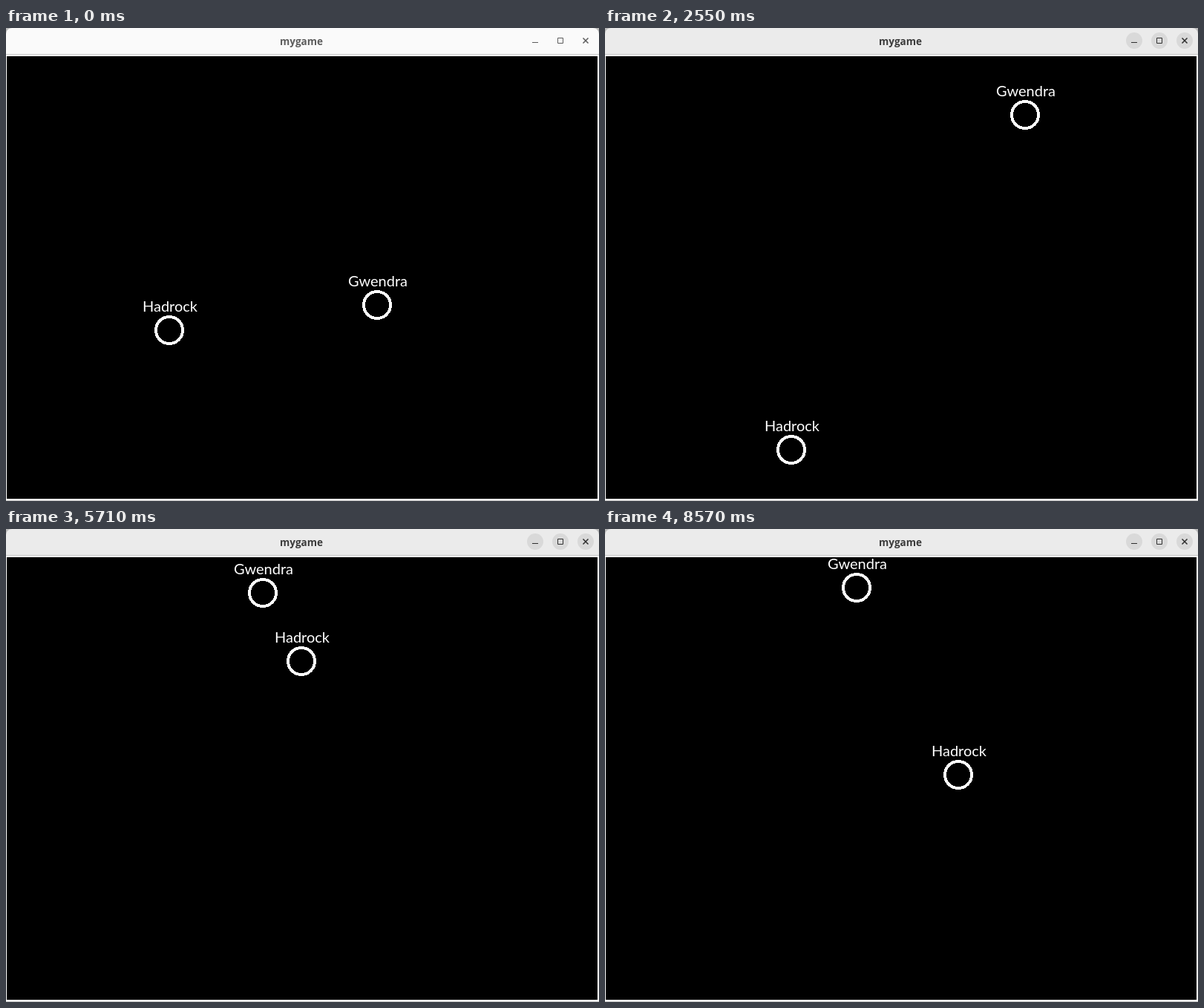
Write an HTML page that moves like this. It is 799 px wide and 637 px high and loops after 8.6 s.

```html
<!DOCTYPE html>
<html lang="en">
<head>
<meta charset="utf-8">
<title>mygame</title>
<style>
  html, body { margin: 0; width: 100%; height: 100%; overflow: hidden; background: #fff; }
  svg { display: block; width: 799px; height: 637px; }
  .bar { fill: #fafafa; }
  .title { font: bold 13.5px "Open Sans", sans-serif; fill: #5c5c5c; text-anchor: middle; }
  .disc { fill: none; }
  .icon { fill: none; stroke: #5c5c5c; }
  .focused .bar { fill: #ebebeb; }
  .focused .title { fill: #3a3a3a; }
  .focused .disc { fill: #d9d9d9; }
  .focused .icon { stroke: #2e2e2e; }
  .player circle { fill: none; stroke: #fff; stroke-width: 4; shape-rendering: crispEdges; }
  .player text { font: 20px Lato, sans-serif; fill: #fff; text-anchor: middle; }
</style>
</head>
<body>
<svg id="win" viewBox="0 0 799 637">
  <rect width="799" height="637" fill="#fff"/>
  <path d="M0 0H8L0 8ZM799 0H791L799 8Z" fill="#b8b8b8"/>
  <path class="bar" d="M0 35V9Q0 0 9 0H790Q799 0 799 9V35Z"/>
  <rect y="35" width="799" height="1" fill="#c8c8c8"/>
  <rect y="636" width="799" height="1" fill="#c8c8c8"/>
  <rect x="1" y="38" width="796" height="596"/>
  <text class="title" x="398" y="23">mygame</text>
  <g class="disc">
    <circle cx="713" cy="17" r="11"/>
    <circle cx="747" cy="17" r="11"/>
    <circle cx="781" cy="17" r="11"/>
  </g>
  <path class="icon" d="M709 19.5h8M743.5 13.5h7v7h-7z"/>
  <path class="icon" d="M777.5 13.5l7 7m0-7l-7 7" stroke-width="1.5"/>
  <g class="player" id="gwendra"><circle r="18"/><text x="1" y="-25">Gwendra</text></g>
  <g class="player" id="hadrock"><circle r="18"/><text x="1" y="-25">Hadrock</text></g>
</svg>
<script>
const LOOP = 8600, TICK = 100 / 3, SPEED = 0.5; // ms, ms, px per ms
const win = document.getElementById("win");

const go = (at, x, y) => ({ at, x, y });

// Each player starts at the first spot, then sets off for the next one at its time.
const moves = {
  gwendra: [go(0, 500, 373), go(200, 559, 186), go(1200, 566, 117),
            go(4000, 533, 291), go(4700, 346, 86), go(5750, 339, 79)],
  hadrock: [go(0, 220, 407), go(1900, 251, 568), go(2700, 627, 294),
            go(5100, 398, 178), go(6200, 439, 352), go(7600, 476, 331)]
};

const hasFocus = t => (t >= 1790 && t < 3900) || t >= 5050;
const limit = (d, max) => Math.sign(d) * Math.min(Math.abs(d), max);

// Arrow-key walk: diagonal while both axes differ, then straight, at constant speed.
function walk(from, to, dist) {
  const dx = to.x - from.x, dy = to.y - from.y;
  const diag = Math.min(Math.abs(dx), Math.abs(dy));
  const reach = dist < diag * Math.SQRT2 ? dist / Math.SQRT2 : diag + dist - diag * Math.SQRT2;
  return { x: from.x + limit(dx, reach), y: from.y + limit(dy, reach) };
}

function positionAt(list, t) {
  return list.reduce((pos, move) => t > move.at ? walk(pos, move, (t - move.at) * SPEED) : pos);
}

function draw(t) {
  const step = Math.floor(t / TICK) * TICK;
  win.classList.toggle("focused", hasFocus(t));
  for (const id in moves) {
    const { x, y } = positionAt(moves[id], step);
    document.getElementById(id).setAttribute("transform", `translate(${Math.round(x)} ${Math.round(y)})`);
  }
}

const start = performance.now();
function frame() {
  draw((performance.now() - start) % LOOP);
  requestAnimationFrame(frame);
}
frame();
</script>
</body>
</html>
```
